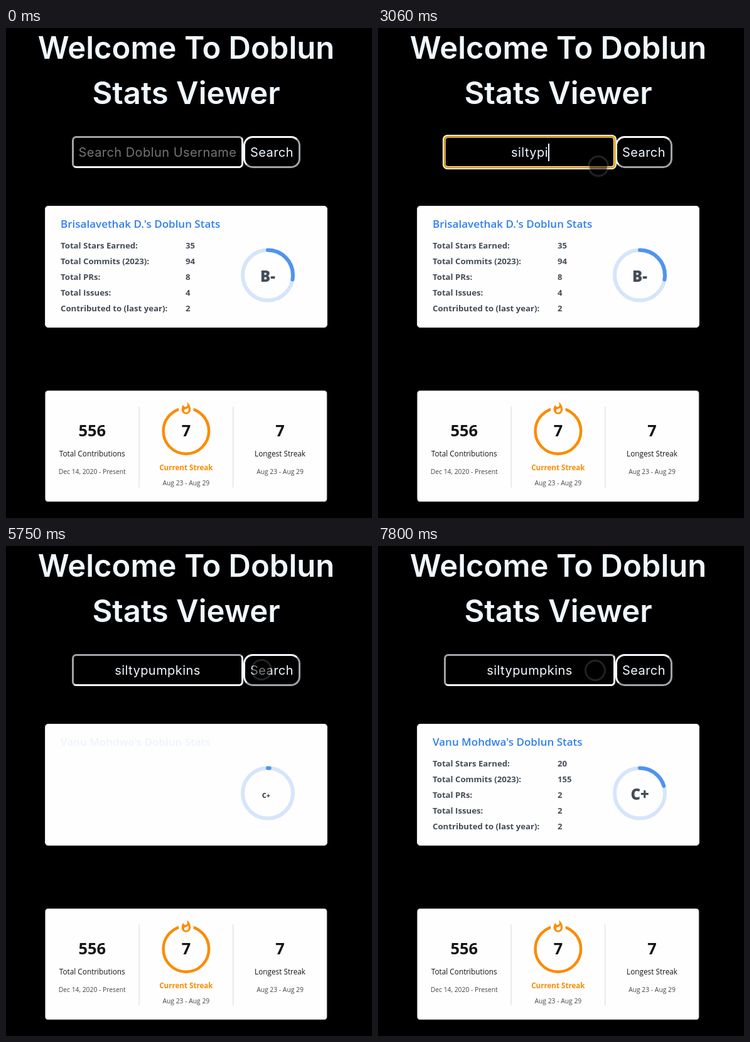
These frames come from a looping animation (583x780 px, 8000 ms). An HTML page:

```html
<!DOCTYPE html>
<html lang="en">
<head>
<meta charset="utf-8">
<title>Stats Viewer</title>
<style>
  html, body { margin: 0; width: 100%; height: 100%; overflow: hidden; background: #000; }
  body { position: relative; }
  svg, .box, #focus, #ring { position: absolute; box-sizing: border-box; }
  svg { left: 0; top: 0; font-family: "Open Sans", "Noto Sans", sans-serif; }
  .title { font: 600 49px Inter, sans-serif; fill: #f0f8ff; }
  .mid { text-anchor: middle; }
  .head { font-size: 17px; font-weight: 600; fill: #2f80ed; }
  .row { font-size: 13.2px; font-weight: 700; fill: #434d58; }
  .rank { font-size: 24px; font-weight: 800; fill: #434d58; }
  .num { font-size: 28px; font-weight: 700; fill: #151515; }
  .label { font-size: 13px; fill: #151515; }
  .hot { font-size: 12.8px; font-weight: 700; fill: #fb8c00; }
  .range { font-size: 11.4px; fill: #464646; }
  .box {
    top: 172px; height: 51px; border: 3px solid;
    display: flex; align-items: center; justify-content: center;
    font: 400 20px Inter, sans-serif; letter-spacing: .45px;
    white-space: pre; color: #f0f8ff;
  }
  #input { left: 105px; width: 273px; border-radius: 7px; border-color: #a0a3a8 #f8fbff #f8fbff #a0a3a8; }
  #button { left: 378px; width: 91px; border-radius: 15px; border-color: #f8fbff #a0a3a8 #a0a3a8 #f8fbff; }
  #hint { position: absolute; color: #757575; }
  #caret { width: 2px; height: 28px; margin-right: -2px; background: #f0f8ff; }
  #focus {
    left: 103px; top: 170px; width: 277px; height: 55px; border-radius: 8px;
    box-shadow: inset 0 0 0 1.5px #fff, inset 0 0 0 4px #e59700;
  }
  #ring {
    left: -17px; top: -17px; width: 34px; height: 34px; border-radius: 50%;
    border: 3px solid rgba(128, 128, 128, .27);
    background: rgba(0, 0, 0, .5) padding-box;
  }
  #ring.pressed { border-color: rgba(128, 128, 128, .4); }
</style>
</head>
<body>
<svg width="583" height="780" viewBox="0 0 583 780">
  <g class="title mid">
    <text x="287" y="49">Welcome To Doblun</text>
    <text x="287" y="121">Stats Viewer</text>
  </g>

  <g transform="translate(62 283)">
    <rect x=".5" y=".5" width="449" height="193" rx="4.5" fill="#fffefe" stroke="#e4e2e2"/>
    <text id="head" class="head" x="25" y="35"></text>
    <g id="rows" class="row"></g>
    <g transform="translate(355 110.5)">
      <g fill="none" stroke="#2f80ed" stroke-width="6">
        <circle r="40" opacity=".2"/>
        <circle id="arc" r="40" opacity=".8" stroke-linecap="round" transform="rotate(-90)"/>
      </g>
      <text id="rank" class="rank mid" y="10.5"></text>
    </g>
  </g>

  <g transform="translate(62.4 577.2) scale(.907)">
    <mask id="gap">
      <rect width="495" height="195" fill="#fff"/>
      <ellipse cx="247.5" cy="32" rx="13" ry="18"/>
    </mask>
    <rect x=".5" y=".5" width="494" height="194" rx="4.5" fill="#fffefe" stroke="#e4e2e2"/>
    <path d="M165 28V170M330 28V170" stroke="#e4e2e2" stroke-width="1.6"/>
    <circle cx="247.5" cy="71" r="40" fill="none" stroke="#fb8c00" stroke-width="5" mask="url(#gap)"/>
    <path transform="translate(247.5 19.5)" fill="#fb8c00" fill-rule="evenodd" d="M1.5 .7C1.5 .7 2.2 3.3 2.2 5.5
      C2.2 7.5 .9 9.2 -1.2 9.2C-3.2 9.2 -4.8 7.5 -4.8 5.5V5.1C-6.8 7.5 -8 10.6 -8 14A8 8 0 0 0 8 14
      C8 8.6 5.4 3.8 1.5 .7ZM-.3 19C-2.1 19 -3.5 17.6 -3.5 15.9C-3.5 14.2 -2.5 13.1 -.7 12.7
      C1.1 12.4 2.9 11.5 3.9 10.2C4.3 11.5 4.5 12.8 4.5 14.2C4.5 16.9 2.4 19 -.3 19Z"/>
    <g class="mid">
      <text class="num" x="82.5" y="80">556</text>
      <text class="label" x="82.5" y="116">Total Contributions</text>
      <text class="range" x="82.5" y="146">Dec 14, 2020 - Present</text>
      <text class="num" x="247.5" y="80">7</text>
      <text class="hot" x="247.5" y="140">Current Streak</text>
      <text class="range" x="247.5" y="166">Aug 23 - Aug 29</text>
      <text class="num" x="412.5" y="80">7</text>
      <text class="label" x="412.5" y="116">Longest Streak</text>
      <text class="range" x="412.5" y="146">Aug 23 - Aug 29</text>
    </g>
  </g>
</svg>

<div id="input" class="box"><span id="hint">Search Doblun Username</span><span id="typed"></span><span id="caret"></span></div>
<div id="button" class="box">Search</div>
<div id="focus"></div>
<div id="ring"></div>

<script>
const LOOP = 8000, FOCUS = 920, BLUR = 5340, RELOAD = 5610;
const USER = 'siltypumpkins', TYPO = 'siltypi';
const $ = id => document.getElementById(id);
const ui = Object.fromEntries(
  ['head', 'rows', 'arc', 'rank', 'hint', 'typed', 'caret', 'focus', 'ring'].map(id => [id, $(id)]));

const LABELS = ['Total Stars Earned:', 'Total Commits (2023):', 'Total PRs:',
  'Total Issues:', 'Contributed to (last year):'];
const PROFILES = [
  { name: 'Brisalavethak D.', values: [35, 94, 8, 4, 2], rank: 'B-', degrees: 100 },
  { name: 'Vanu Mohdwa', values: [20, 155, 2, 2, 2], rank: 'C+', degrees: 73 },
];

// Times at which the input text changes
const KEYS = [2020, 2120, 2320, 2520, 2660, 2730].map((t, i) => [t, USER.slice(0, i + 1)]).concat(
  [[3060, TYPO], [3190, USER.slice(0, 6)]],
  [3460, 3680, 3810, 4010, 4150, 4280, 4350].map((t, i) => [t, USER.slice(0, i + 7)]));

// Pointer moves: start, end, target
const START = [447, 401];
const MOVES = [
  [250, 720, 191, 162], [1250, 1460, 351, 220],
  [4810, 5130, 407, 197], [7660, 7800, 346, 198],
];

const rows = LABELS.map((label, i) => {
  const row = document.createElementNS('http://www.w3.org/2000/svg', 'g');
  row.innerHTML = `<text x="25" y="${68 + 25 * i}">${label}</text><text x="224" y="${68 + 25 * i}"></text>`;
  return ui.rows.appendChild(row);
});

const within = (t, a, b) => t >= a && t < b;
const ease = (t, start, length) => {
  const p = Math.min(1, Math.max(0, (t - start) / length));
  return p * p * (3 - 2 * p);
};
const show = (el, on) => { el.style.visibility = on ? 'visible' : 'hidden'; };

function drawSearch(t) {
  const text = KEYS.reduce((last, [at, value]) => t >= at ? value : last, '');
  ui.typed.textContent = text;
  show(ui.hint, !text);
  show(ui.focus, within(t, FOCUS, BLUR));
  show(ui.caret, within(t, FOCUS, 1420) || within(t, 1920, 4850));
}

function drawStats(t) {
  const fresh = t >= RELOAD;
  const profile = PROFILES[+fresh];
  const age = fresh ? t - RELOAD : LOOP;
  const pop = ease(age, 0, 300);
  ui.head.textContent = `${profile.name}'s Doblun Stats`;
  ui.head.setAttribute('opacity', ease(age, 0, 800));
  rows.forEach((row, i) => {
    row.lastChild.textContent = profile.values[i];
    row.setAttribute('opacity', ease(age, 450 + 150 * i, 300));
  });
  ui.rank.textContent = profile.rank;
  ui.rank.setAttribute('transform', `translate(${5 * (pop - 1)} ${5 * (1 - pop)}) scale(${pop})`);
  const turn = 80 * Math.PI;
  const length = turn * profile.degrees / 360 * ease(age, 0, 1000);
  ui.arc.setAttribute('stroke-dasharray', `${length} ${turn}`);
}

function drawPointer(t) {
  let [x, y] = START;
  for (const [from, to, toX, toY] of MOVES) {
    const p = ease(t, from, to - from);
    x += (toX - x) * p;
    y += (toY - y) * p;
  }
  ui.ring.style.transform = `translate(${x}px, ${y}px)`;
  ui.ring.className = within(t, FOCUS, 1120) || within(t, BLUR, 5540) ? 'pressed' : '';
  show(ui.ring, t >= 250);
}

function draw(t) {
  drawSearch(t);
  drawStats(t);
  drawPointer(t);
}

let origin;
function tick(now) {
  origin ??= now;
  draw((now - origin) % LOOP);
  requestAnimationFrame(tick);
}
draw(0);
requestAnimationFrame(tick);
</script>
</body>
</html>
```
